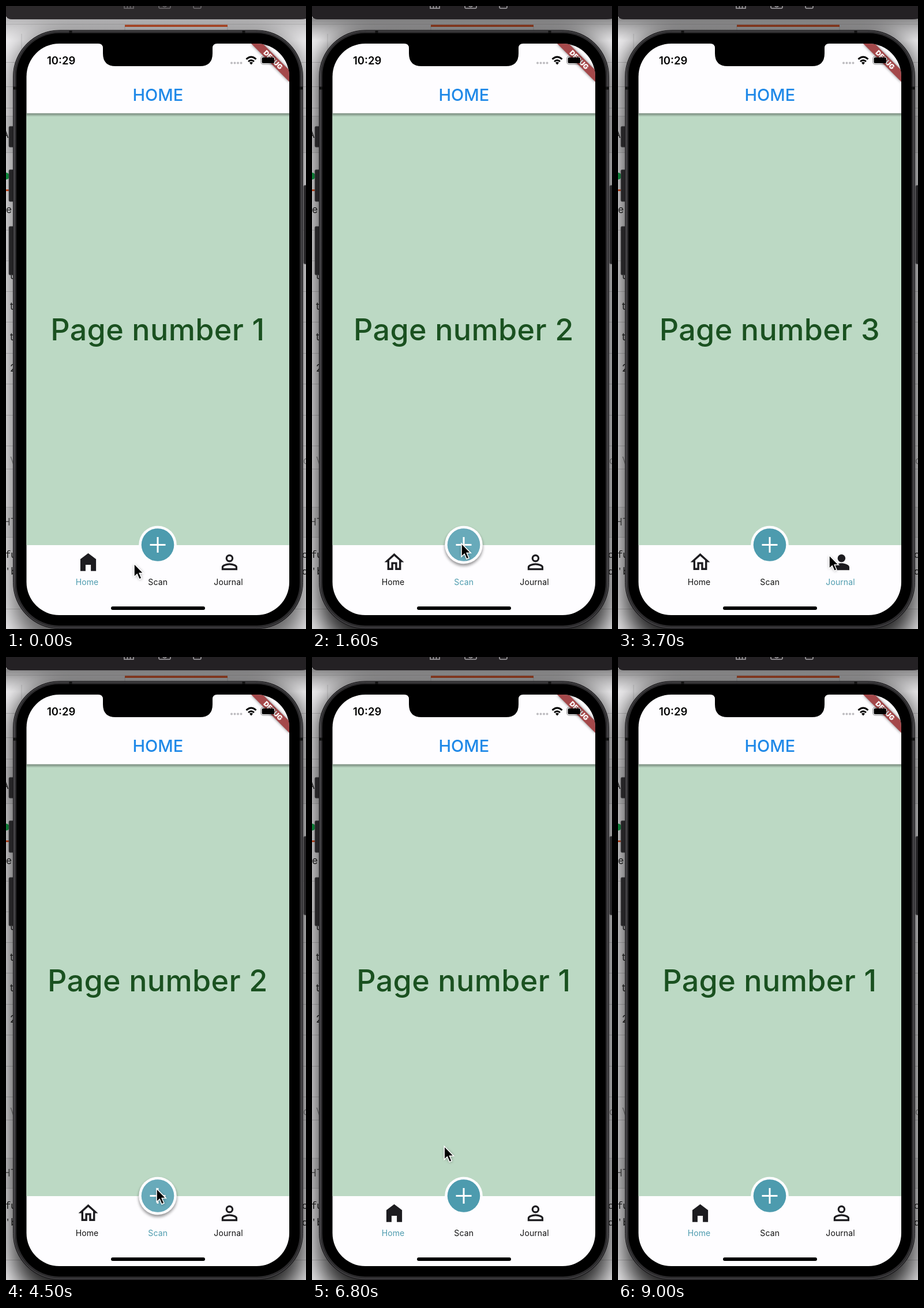
Animation, 520 px wide and 1077 px high, one loop 9100 ms. Source, as an HTML page:

```html
<!DOCTYPE html>
<html lang="en">
<head>
<meta charset="utf-8">
<title>Tab navigation</title>
<style>
  html, body { margin: 0; width: 100%; height: 100%; overflow: hidden; background: #eee; }
  svg { display: block; width: 520px; height: 1077px; font-family: Inter, sans-serif; }
  .mid { text-anchor: middle; }
  .mono { font-family: "Noto Sans Mono", monospace; }
</style>
</head>
<body>
<svg viewBox="0 0 520 1077">
  <defs>
    <filter id="soft" x="-50%" y="-50%" width="200%" height="200%"><feGaussianBlur stdDeviation="22"/></filter>
    <filter id="small" x="-50%" y="-50%" width="200%" height="200%"><feGaussianBlur stdDeviation="2.500"/></filter>
    <linearGradient id="fade" x1="0" y1="0" x2="0" y2="1">
      <stop offset="0" stop-color="#000"/>
      <stop offset="1" stop-color="#000" stop-opacity="0"/>
    </linearGradient>
    <linearGradient id="rim">
      <stop offset="0" stop-color="#555457"/><stop offset=".008" stop-color="#2c2b2d"/>
      <stop offset=".992" stop-color="#2c2b2d"/><stop offset="1" stop-color="#555457"/>
    </linearGradient>
    <clipPath id="screen"><rect x="35.500" y="65" width="455.500" height="988" rx="57"/></clipPath>
    <clipPath id="nav"><rect x="35" y="932" width="457" height="121"/></clipPath>
  </defs>

  <!-- desktop window behind -->
  <rect width="520" height="1077" fill="#f1f0f2"/>
  <rect y="190" width="520" height="63" fill="#e3e2e4"/>
  <rect y="866" width="520" height="52" fill="#e3e2e4"/>
  <g id="rules" stroke="#c9c8ca"></g>
  <path d="M206 35V60M384 35V60M27 48V90" stroke="#cfcfd1"/>
  <rect y="31" width="520" height="1" fill="#d6d5d7"/>
  <rect x="206" y="32.500" width="178" height="3.500" fill="#e8592a"/>
  <rect y="317" width="12" height="3" fill="#e8592a"/>
  <circle cy="294" r="6" fill="#12a84a"/>
  <g id="scraps" font-size="17" fill="#222"></g>

  <!-- shadows, stronger once the window is active -->
  <rect id="shade" x="12" y="48" width="503" height="1062" rx="80" filter="url(#soft)"/>
  <rect id="barShade" y="20" width="520" height="40" fill="url(#fade)"/>

  <!-- title bar -->
  <path id="bar" d="M0 0H520V22Q516 23 510 23H10Q3 23 0 18Z"/>
  <g id="tools" fill="none" stroke-width="1.600">
    <path d="M205 -3V4H221V-3M210.500 4V-1H215.500V4"/>
    <path d="M265 -3V2Q265 4 267 4H283Q285 4 285 2V-3"/><circle cx="275" cy="-2" r="3.500"/>
    <path d="M325 -3V2Q325 4 327 4H336Q338 4 338 2V-3"/>
  </g>

  <!-- device -->
  <g fill="#252426" stroke="#4b4a4d" stroke-width=".8">
    <rect x="5" y="208" width="9" height="36" rx="2"/>
    <rect x="5" y="283" width="9" height="55" rx="2"/>
    <rect x="5" y="381" width="9" height="84" rx="2"/>
    <rect x="516" y="310" width="9" height="136" rx="2"/>
  </g>
  <rect x="12.500" y="42" width="502" height="1034.500" rx="80" fill="url(#rim)" stroke="#171618"/>
  <rect x="14" y="43.500" width="499" height="1031.500" rx="78.500" fill="none" stroke="#4e4d50"/>
  <rect x="18" y="47" width="491" height="1024" rx="74"/>
  <path d="M112 43V47M412 43V47M13 142H18M509 142H514" stroke="#111" stroke-width="5"/>

  <g clip-path="url(#screen)">
    <rect x="35" y="65" width="457" height="988" fill="#fefdff"/>
    <rect x="35" y="185.500" width="457" height="746.500" fill="#bcd9c4"/>
    <rect x="35" y="185.500" width="457" height="6" fill="url(#fade)" opacity=".38"/>
    <text class="mid" x="263.300" y="163.500" font-size="29" font-weight="500" fill="#2089e8">HOME</text>
    <text id="page" class="mid" x="262.800" y="578" font-size="52" font-weight="500" letter-spacing=".38" fill="#1a5120"></text>

    <path d="M425 65H445L492 112V132Z" opacity=".55" filter="url(#small)"/>
    <path d="M425 65H445L492 112V132Z" fill="#a4484a"/>
    <text class="mid" transform="translate(463 93) rotate(45)" y="4.300" font-size="11.800" font-weight="900" fill="#fff">DEBUG</text>

    <path d="M160 65Q168 65 168 73V82Q168 104 190 104H336Q358 104 358 82V73Q358 65 366 65Z"/>
    <text x="71" y="100.500" font-size="18.500" font-weight="600">10:29</text>
    <path d="M391 98.500H409" stroke="#bdbcc0" stroke-width="4" stroke-linecap="round" stroke-dasharray="0 5.500"/>
    <path d="M416.500 92Q425 84 433.500 92M420 96Q425 91.500 430 96" fill="none" stroke="#000" stroke-width="3"/>
    <path d="M422 98Q425 95.500 428 98L425 101.500Z"/>
    <rect x="441.700" y="87" width="25.200" height="13.800" rx="4.200" fill="none" stroke="#000" stroke-opacity=".4" stroke-width="1.200"/>
    <rect x="443.500" y="88.800" width="21.600" height="10.200" rx="2.600"/>
    <path d="M468.500 91.500Q471 94 468.500 96.500Z" opacity=".45"/>

    <circle id="ripple" cy="961" r="41" fill="#efeef0" clip-path="url(#nav)"/>
    <g transform="translate(122.100 941) scale(1.7)" fill="#1d1c20">
      <path id="homeOn" d="M4 21V9l8-6 8 6v12h-5.300v-6.300H9.300V21z"/>
      <path id="homeOff" d="M12 5.690l5 4.500V18h-2v-6H9v6H7v-7.810l5-4.500M12 3L2 12h3v8h6v-6h2v6h6v-8h3z"/>
    </g>
    <g transform="translate(367 941.200) scale(1.7)" fill="#1d1c20">
      <path id="userOn" d="M12 12a4 4 0 1 0 0-8 4 4 0 0 0 0 8zm0 1c-2.670 0-8 1.340-8 4v3h16v-3c0-2.660-5.330-4-8-4z"/>
      <g id="userOff" fill="none" stroke="#1d1c20" stroke-width="1.900">
        <circle cx="12" cy="8" r="3.050"/>
        <path d="M4.950 19.050V17C4.950 15.500 8.500 13.950 12 13.950S19.050 15.500 19.050 17V19.050Z"/>
      </g>
    </g>
    <g class="mid" font-size="14" letter-spacing=".1">
      <text class="tab" x="140.500" y="1001">Home</text>
      <text class="tab" x="263.200" y="1001">Scan</text>
      <text class="tab" x="385.500" y="1001">Journal</text>
    </g>

    <circle id="lift" cx="263" cy="935" r="33" filter="url(#small)"/>
    <circle cx="263" cy="931.500" r="32.800" fill="#fefdff"/>
    <circle cx="263" cy="931.500" r="28.300" fill="#4d9bae"/>
    <path d="M249.500 931.500H276.500M263 918V945" stroke="#fff" stroke-width="3"/>
    <circle id="glow" cx="263" cy="931.500" r="28.300" fill="#fff"/>
    <rect x="182" y="1038" width="163" height="6" rx="3"/>
  </g>

  <g id="cursor">
    <path d="M0 1V24L5 19 9 28 14 26 10 17H17Z" opacity=".35" filter="url(#small)"/>
    <path d="M0 0V23L5.200 18.200 9 27 13 25.300 9.200 16.600H16.300Z" stroke="#fff" stroke-width="1.500"/>
  </g>
</svg>
<script>
  const LOOP = 9100, STEP = 100;
  const el = id => document.getElementById(id);
  const tabs = document.querySelectorAll(".tab");

  // time, tip x, tip y
  const PATH = [
    [0, 222, 964], [600, 222, 964], [1200, 259, 929], [2000, 259, 929],
    [2300, 414, 960], [2400, 414, 960], [2700, 392, 957], [3500, 392, 957],
    [4200, 261, 919], [4800, 261, 919], [5300, 140, 961], [6500, 140, 961],
    [7300, 422, 597], [7900, 422, 597], [8600, 452, -32], [LOOP, 452, -32]
  ];
  // time, selected tab
  const PAGES = [[0, 0], [1500, 1], [3000, 2], [4400, 1], [5600, 0]];
  const ACTIVE_AT = 1300;

  const RULES = [97, 139, 176, 190, 253, 387, 440, 493, 546, 600, 653, 707, 760, 800, 866, 918, 1042];
  el("rules").innerHTML = RULES.map(y => `<path d="M0 ${y}.5H520"/>`).join("");

  const SCRAPS = [
    [-7, 228, "AI"], [0, 358, "e"], [7, 472, "t"], [7, 525, "t"], [7, 578, "t"], [7, 632, "2"],
    [7, 792, "V", "#999"], [-5, 898, "HT", "#555"], [-2, 954, "fu"], [-2, 983, "'b"],
    [515, 792, "o", "#999"], [513, 954, "o"], [513, 983, "d"]
  ];
  el("scraps").innerHTML = SCRAPS.map(([x, y, s, c = "#222"]) =>
    `<text class="${y > 900 ? "mono" : ""}" x="${x}" y="${y}" fill="${c}">${s}</text>`).join("");

  function cursorAt(t) {
    const i = PATH.findIndex((p, k) => k && t <= p[0]);
    const [t0, x0, y0] = PATH[i - 1], [t1, x1, y1] = PATH[i];
    const u = (t - t0) / (t1 - t0), e = u * u * (3 - 2 * u);
    return [x0 + (x1 - x0) * e, y0 + (y1 - y0) * e];
  }

  // full while held, then fades
  function press(t, from, to, fade) {
    if (t < from) return 0;
    return t <= to ? 1 : Math.max(0, 1 - (t - to) / fade);
  }

  const alpha = (id, v) => el(id).setAttribute("opacity", +v);

  function draw(t) {
    const tab = PAGES.filter(p => p[0] <= t).pop()[1];
    el("page").textContent = `Page number ${tab + 1}`;
    tabs.forEach((n, i) => n.setAttribute("fill", i === tab ? "#4d9bae" : "#111"));
    alpha("homeOn", tab === 0);
    alpha("homeOff", tab !== 0);
    alpha("userOn", tab === 2);
    alpha("userOff", tab !== 2);

    const user = press(t, 2900, 3000, 300), home = press(t, 5500, 5600, 300);
    el("ripple").setAttribute("cx", user ? 385.5 : 140.5);
    alpha("ripple", Math.max(user, home));

    const fab = Math.max(press(t, 1400, 1600, 300), press(t, 4300, 4500, 300));
    alpha("lift", fab * .4);
    alpha("glow", fab * .15);

    const awake = t >= ACTIVE_AT;
    alpha("shade", awake ? .88 : .62);
    alpha("barShade", awake ? .45 : .25);
    el("bar").setAttribute("fill", awake ? "#242124" : "#2c292b");
    el("tools").setAttribute("stroke", awake ? "#a5a3a6" : "#6d6a6d");

    el("cursor").setAttribute("transform", `translate(${cursorAt(t)})`);
  }

  const start = performance.now();
  function tick() {
    const t = (performance.now() - start) % LOOP;
    draw(Math.floor(t / STEP) * STEP);
    requestAnimationFrame(tick);
  }
  tick();
</script>
</body>
</html>
```
